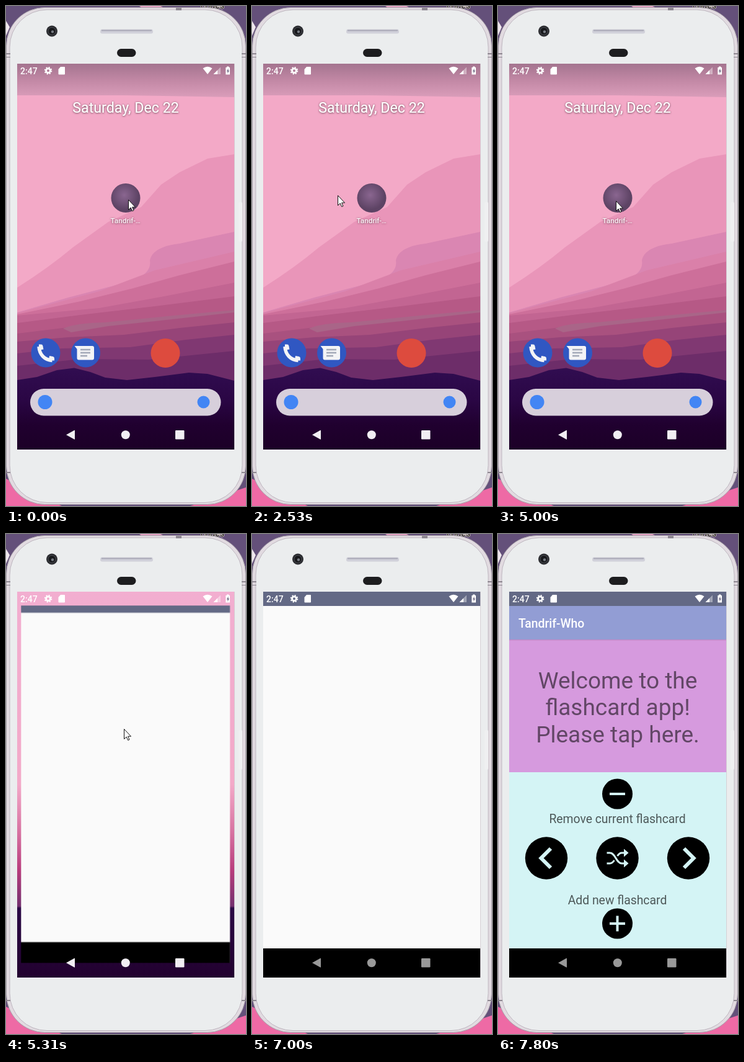
Recreate the animation shown at these times as an HTML page. Size 387x806 px, loop 8 s.

```html
<!DOCTYPE html>
<html lang="en">
<head>
<meta charset="utf-8">
<title>Flashcard app launch</title>
<style>
html, body { margin: 0; width: 100%; height: 100%; overflow: hidden; background: #6a5478; }
svg { display: block; width: 100vw; height: 100vh; font-family: Roboto, sans-serif; }
.medium { font-weight: 500; }
.mid { text-anchor: middle; }
.line { fill: none; stroke: #d4f4f5; }

#cursor, #launcher, #launch, #window, #cards, #nav { animation: 8s step-end infinite; }
#cursor { animation-name: cursor; }
#launcher { animation-name: press; transform-origin: 193px 309.5px; }
#launch { animation-name: launch; }
#window { animation-name: window; transform-origin: 193px 404px; }
#cards { animation-name: cards; }
#nav { animation-name: dim; }

@keyframes cursor {
  0% { transform: translate(197px, 312px); }
  6.25% { transform: translate(286px, 348px); }
  7.75% { transform: translate(-50px, -50px); }
  19.5% { transform: translate(375px, 361px); }
  21.375% { transform: translate(292px, 331px); }
  22.875% { transform: translate(204px, 305px); }
  24.75% { transform: translate(183px, 293px); }
  26.625% { transform: translate(181px, 291px); }
  29.75% { transform: translate(151px, 298px); }
  31.625% { transform: translate(138px, 305px); }
  33.125% { transform: translate(126px, 309px); }
  34.625% { transform: translate(118px, 309px); }
  36.125% { transform: translate(115px, 307px); }
  38% { transform: translate(134px, 307px); }
  39.875% { transform: translate(188px, 325px); }
  41.75% { transform: translate(189px, 318px); }
  43.25% { transform: translate(190px, 314px); }
  73.125% { transform: translate(200px, 327px); }
  75% { transform: translate(255px, 363px); }
  77% { transform: translate(303px, 385px); }
  78.875% { transform: translate(353px, 400px); }
  80.75%, 100% { transform: translate(-50px, -50px); }
}
@keyframes press {
  0% { transform: scale(1); }
  56% { transform: scale(1.04); }
  57.5% { transform: scale(1.07); }
  61% { transform: scale(1.1); }
  62.5%, 100% { transform: scale(1); }
}
@keyframes launch {
  0% { visibility: hidden; }
  66.375%, 100% { visibility: visible; }
}
@keyframes window {
  0% { visibility: hidden; }
  66.375% { visibility: visible; transform: scale(.962); clip-path: inset(11.4px 0 12.5px); }
  67.875% { visibility: visible; transform: scale(.99); clip-path: inset(2px 0 2px); }
  69.75%, 100% { visibility: visible; transform: scale(1); clip-path: none; }
}
@keyframes cards {
  0% { opacity: 0; }
  96% { opacity: .14; }
  97.5%, 100% { opacity: 1; }
}
@keyframes dim {
  0% { fill: #f1eef3; }
  82.625% { fill: #c2c2c2; }
  87.5%, 100% { fill: #999; }
}
</style>
</head>
<body>
<svg viewBox="0 0 387 806" preserveAspectRatio="none">
  <defs>
    <linearGradient id="scrim" x2="0" y2="1">
      <stop stop-color="#a4748f"/><stop offset=".5" stop-color="#c288a5"/><stop offset="1" stop-color="#da9dba"/>
    </linearGradient>
    <linearGradient id="night" x2="0" y2="1">
      <stop stop-color="#310d51"/><stop offset=".4" stop-color="#2a0644"/>
      <stop offset=".7" stop-color="#20002f"/><stop offset="1" stop-color="#1c0027"/>
    </linearGradient>
    <linearGradient id="dusk" x2="0" y2="1">
      <stop stop-color="#f2aed0"/><stop offset=".5" stop-color="#f3a9c8"/><stop offset=".63" stop-color="#d56f9f"/>
      <stop offset=".72" stop-color="#b93d7d"/><stop offset=".815" stop-color="#74306f"/>
      <stop offset=".82" stop-color="#2a0845"/><stop offset="1" stop-color="#22012f"/>
    </linearGradient>
    <radialGradient id="violet" cx=".45" cy=".4">
      <stop stop-color="#8a6690"/><stop offset="1" stop-color="#5d4364"/>
    </radialGradient>
    <filter id="shade" x="-20%" y="-40%" width="140%" height="180%">
      <feDropShadow dx="0" dy=".6" stdDeviation="1.6" flood-color="#38282f" flood-opacity=".85"/>
    </filter>
    <clipPath id="screen"><path d="M18 93h350v622H18z"/></clipPath>
  </defs>

  <!-- desktop behind the phone -->
  <path fill="#64507a" d="M0 0h387v806H0z"/>
  <path fill="#e8a5c6" d="M215 0h34l12 6h-38z"/>
  <path fill="#f0e8ee" d="M0 24l6 10-6 14z"/>
  <path fill="#ee6aa5" d="M0 762l90 44H0zM387 776l-90 30h90z"/>
  <text x="314" y="4" font-size="14" stroke="#eee6d8" stroke-width="1.5" paint-order="stroke">codes</text>

  <!-- phone body -->
  <rect x=".5" y="2.500" width="386" height="801" rx="62" fill="#e2dbe1" stroke="#a69fa8"/>
  <rect x="6" y="6" width="375" height="794.5" rx="60" fill="#ebedee" stroke="#bdb5be"/>
  <path fill="#8d8790" d="M0 76h7v2H0zM0 82h7v1H0zM380 76h7v2h-7zM380 82h7v1h-7zM0 751h7v2H0zM380 751h7v2h-7zM274 3h9v4h-9z"/>
  <rect x="375" y="316" width="6" height="64" rx="2" fill="#eff0f1"/>
  <circle cx="74" cy="40.5" r="9" fill="#2b2c30"/>
  <circle cx="74" cy="40.5" r="6" fill="#17181b" stroke="#4b4d53"/>
  <circle cx="75" cy="41.5" r="2.2" fill="#777b83"/>
  <rect x="152" y="37.5" width="85" height="7" rx="3" fill="#d1d1da"/>
  <path d="M154 39.5h81" stroke="#aaaab8" stroke-width="2"/>
  <rect x="179" y="69" width="30.5" height="13" rx="6.5" fill="#1d1d1f"/>
  <path fill="#d5d0d5" d="M368 93h1v622h-1z"/>

  <g clip-path="url(#screen)">
    <!-- wallpaper -->
    <path fill="#f3a9c7" d="M18 93h350v622H18z"/>
    <path fill="url(#scrim)" d="M18 93h350v54L190 144H18z"/>
    <path fill="#e995b9" d="M18 454Q70 421 108 389L165 348 218 324 250 288 280 268 325 246 368 239V720H18z"/>
    <path fill="#da86b2" d="M18 494L100 470 200 444Q236 432 232 410 236 388 280 383L368 364V720H18z"/>
    <path fill="#da80a9" d="M18 495L150 460 240 426 368 396V720H18z"/>
    <path fill="#cd6f9a" d="M18 497L120 476 205 455 280 434 368 412V720H18z"/>
    <path fill="#c26592" d="M18 499L150 487 255 468 368 446V720H18z"/>
    <path fill="#b65986" d="M18 511L120 498 240 484 368 468V720H18z"/>
    <path fill="#a9517f" d="M18 528L100 518 220 507 368 490V720H18z"/>
    <path fill="#a96588" d="M92 520Q110 511 160 510L260 500 368 490V494L250 507 165 516 105 526z"/>
    <path fill="#964478" d="M18 541L100 534 190 530 280 519 368 510V720H18z"/>
    <path fill="#803872" d="M18 560L90 552 200 550 290 538 368 530V720H18z"/>
    <path fill="#6d2d69" d="M18 580L120 569 230 570 368 556V720H18z"/>
    <path fill="url(#night)" d="M18 603L50 598 82 587 110 583.5 136 590 160 599 195 603 240 598 295 591 325 593 368 604V715H18z"/>

    <!-- home screen -->
    <text class="mid" x="193" y="172" font-size="23.2" fill="#fff" filter="url(#shade)">Saturday, Dec 22</text>
    <circle id="launcher" cx="193" cy="309.5" r="23.5" fill="url(#violet)"/>
    <text class="mid" x="192.5" y="350" font-size="11.8" fill="#fff" filter="url(#shade)">Tandrif-…</text>

    <g fill="#3057c2">
      <circle cx="64" cy="559" r="23.5"/>
      <circle cx="128.5" cy="559" r="23.5"/>
      <circle cx="257" cy="559.5" r="23.5" fill="#dd4b3e"/>
    </g>
    <g fill="none" stroke="#f4f4f6" stroke-linejoin="round">
      <path stroke-width="5.5" d="M53 549C54 562 62 570.5 74.5 571.5"/>
      <path stroke-width="6" d="M53 548.5h3.5l1 5.5M75 571.5v-3.5l-5.5-1"/>
    </g>
    <path fill="#f4f4f6" d="M110.5 548H139a3 3 0 0 1 3 3V567.5a3 3 0 0 1-3 3H117.500a3 3 0 0 1-3-3V553z"/>
    <path stroke="#a3a9b8" stroke-width="2.4" d="M120 554h16M120 559h16M120 564h11"/>

    <rect x="39" y="617" width="307.5" height="43.5" rx="21.75" fill="#d7cfdb"/>
    <circle cx="63" cy="638.5" r="11.5" fill="#4285f4"/>
    <circle cx="318.5" cy="638.5" r="10" fill="#4285f4"/>

    <!-- app opening -->
    <path id="launch" fill="url(#dusk)" d="M18 93h350v622H18z"/>
    <g id="window">
      <path fill="#fafafa" d="M18 93h350v622H18z"/>
      <path fill="#636985" d="M18 93h350v23H18z"/>
      <path d="M18 668h350v47H18z"/>
    </g>

    <g id="cards">
      <path fill="#d4f4f5" d="M18 384h350v284H18z"/>
      <path fill="#d69ade" d="M18 170h350v214H18z"/>
      <path fill="#929dd4" d="M18 116h350v54H18z"/>
      <path fill="#000" opacity=".1" d="M18 170h350v1.5H18z"/>
      <text class="medium" x="33" y="150.5" font-size="19.4" fill="#fff">Tandrif-Who</text>
      <g class="mid" fill-opacity=".54">
        <g font-size="37">
          <text x="193" y="249">Welcome to the</text>
          <text x="193" y="292.3">flashcard app!</text>
          <text x="193" y="335.7">Please tap here.</text>
        </g>
        <g font-size="19.35" fill-opacity=".64">
          <text x="192.5" y="465.5">Remove current flashcard</text>
          <text x="192.5" y="597">Add new flashcard</text>
        </g>
      </g>
      <circle cx="192.5" cy="419" r="24.5"/>
      <circle cx="192.5" cy="628" r="24.5"/>
      <circle cx="78" cy="522.5" r="34.2"/>
      <circle cx="192.5" cy="522.5" r="34.2"/>
      <circle cx="307" cy="522.5" r="34.2"/>
      <path class="line" stroke-width="4" d="M180 419h25M180 628h25M192.5 615.5v25"/>
      <path class="line" stroke-width="6" d="M85 507L69.5 522.5 85 538M300 507L315.5 522.5 300 538"/>
      <path class="line" stroke-width="3" d="M175.5 514h5c9 0 10 17 19 17h6M175.5 531h5c3 0 5-2 7-5M192.5 519c2-3 4-5 7-5h6"/>
      <path fill="#d4f4f5" d="M203 507.5l7.5 6.5-7.5 6.5zM203 524.5l7.5 6.5-7.5 6.5z"/>
    </g>

    <!-- system bars -->
    <g fill="#fff">
      <text class="medium" x="23" y="109.5" font-size="14">2:47</text>
      <circle cx="68" cy="104.3" r="3.4" fill="none" stroke="#fff" stroke-width="2.8"/>
      <circle cx="68" cy="104.3" r="5.3" fill="none" stroke="#fff" stroke-width="2" stroke-dasharray="2.1 2.063"/>
      <path d="M88 98h6a1 1 0 0 1 1 1v10.5a1 1 0 0 1-1 1h-8.5a1 1 0 0 1-1-1V102z"/>
      <path d="M317.5 100.5Q325 95 332.5 100.5L325 110z"/>
      <path opacity=".4" d="M346 98.5V110H334.5z"/>
      <path d="M341 103.5V110H334.5z"/>
      <path d="M356 97.5h3.5V99H361v11.5h-6.7V99H356z"/>
      <path fill="#77708a" d="M358.5 100.5l-2.7 5h1.6v3.5l2.6-5h-1.5z"/>
    </g>
    <g id="nav">
      <path d="M97 691.3L110 684q1-.5 1 .6v13.4q0 1.1-1 .6z"/>
      <circle cx="192.8" cy="691.3" r="7"/>
      <rect x="273" y="684" width="14.5" height="14.5" rx="1.2"/>
    </g>
  </g>

  <path id="cursor" fill="#fff" stroke="#111" d="M.5.5V16.5L4.2 13 6.7 18.5 9 17.5 6.6 12.2H11.5z"/>
</svg>
</body>
</html>
```
